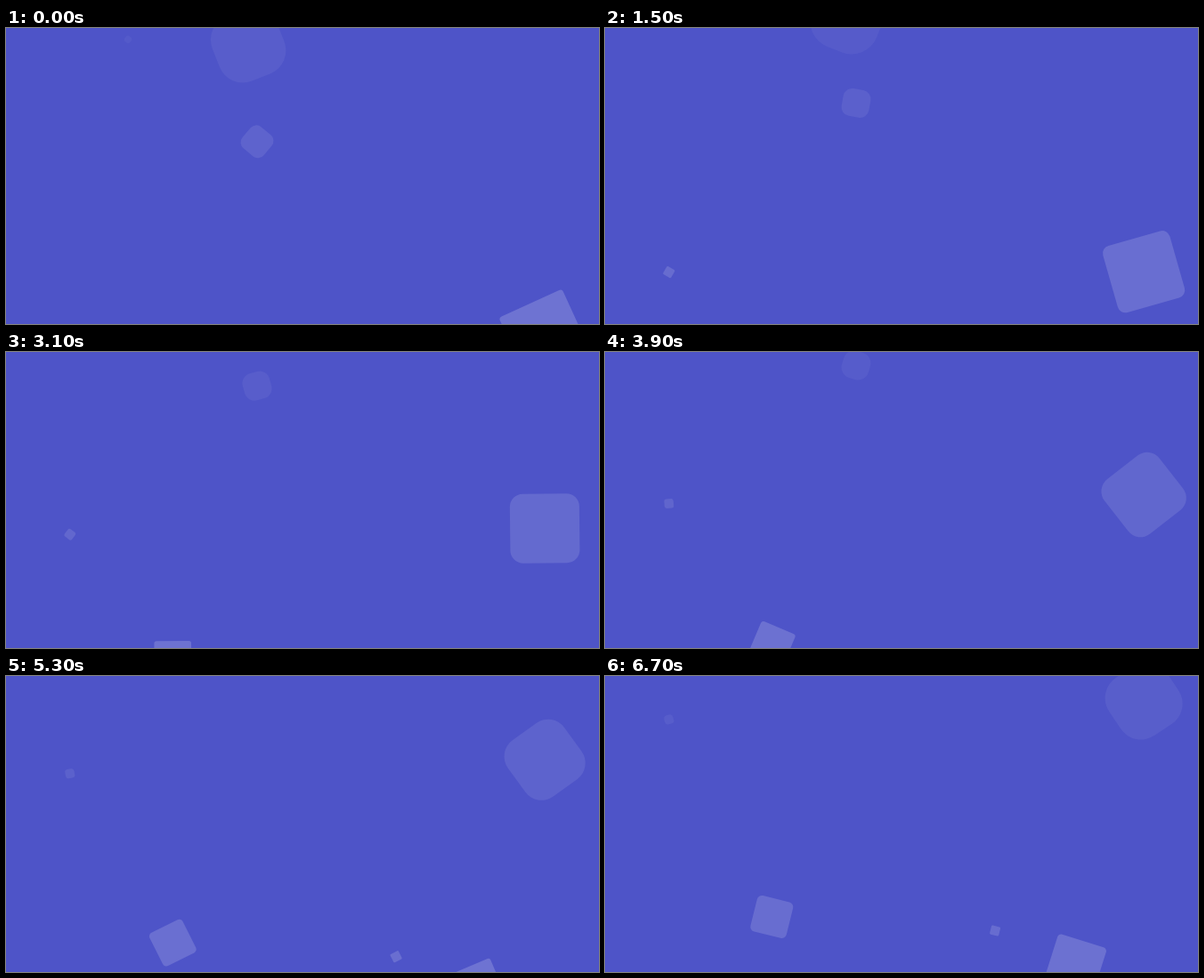
An HTML page with a canvas that plays this animation: 666 by 333 pixels, repeating every 6800 ms.

```html
<!DOCTYPE html>
<html lang="en">
<head>
<meta charset="utf-8">
<title>Rising squares</title>
<style>
  html, body { margin: 0; width: 100%; height: 100%; overflow: hidden; background: #4e54c8; }
  canvas { display: block; }
</style>
</head>
<body>
<canvas id="stage" width="666" height="333"></canvas>
<script>
const ctx = document.getElementById('stage').getContext('2d');
const W = 666, H = 333;
const SCALE = W / 1280;
const LOOP = 6800, STEP = 100;
const START = 100;    // seconds the scene has already been running
const RATE = 1.005;   // scene seconds per played second
const FLOOR = 829;    // lower edge of a square before it rises
const RISE = 996;

// left is a fraction of the width; delay and duration are in seconds
const square = (left, size, { delay = 0, duration = 25 } = {}) => ({ left, size, delay, duration });

const squares = [
  square(0.10, 20, { delay: 2, duration: 12 }),
  square(0.20, 15, { delay: 2, duration: 35 }),
  square(0.25, 80),
  square(0.35, 150, { delay: 7 }),
  square(0.40, 60, { duration: 18 }),
  square(0.65, 20),
  square(0.75, 110, { delay: 3 }),
  square(0.85, 150, { duration: 11 })
];

// Each square rises, makes two turns, becomes a circle and fades out.
function drawSquare({ left, size, delay, duration }, time) {
  const p = ((time - delay) % duration) / duration;
  const side = size * SCALE;
  ctx.save();
  ctx.translate(left * W + side / 2, (FLOOR - size / 2 - RISE * p) * SCALE);
  ctx.rotate(p * 4 * Math.PI);
  ctx.fillStyle = `rgba(255, 255, 255, ${0.2 * (1 - p)})`;
  ctx.beginPath();
  ctx.roundRect(-side / 2, -side / 2, side, side, side * p / 2);
  ctx.fill();
  ctx.restore();
}

function draw(ms) {
  const step = Math.floor((ms % LOOP) / STEP);
  const time = START + step * STEP / 1000 * RATE;
  ctx.fillStyle = '#4e54c8';
  ctx.fillRect(0, 0, W, H);
  for (const sq of squares) drawSquare(sq, time);
}

let begin = null;
function tick(now) {
  if (begin === null) begin = now;
  draw(Math.max(0, now - begin));
  requestAnimationFrame(tick);
}
draw(0);
requestAnimationFrame(tick);
</script>
</body>
</html>
```
